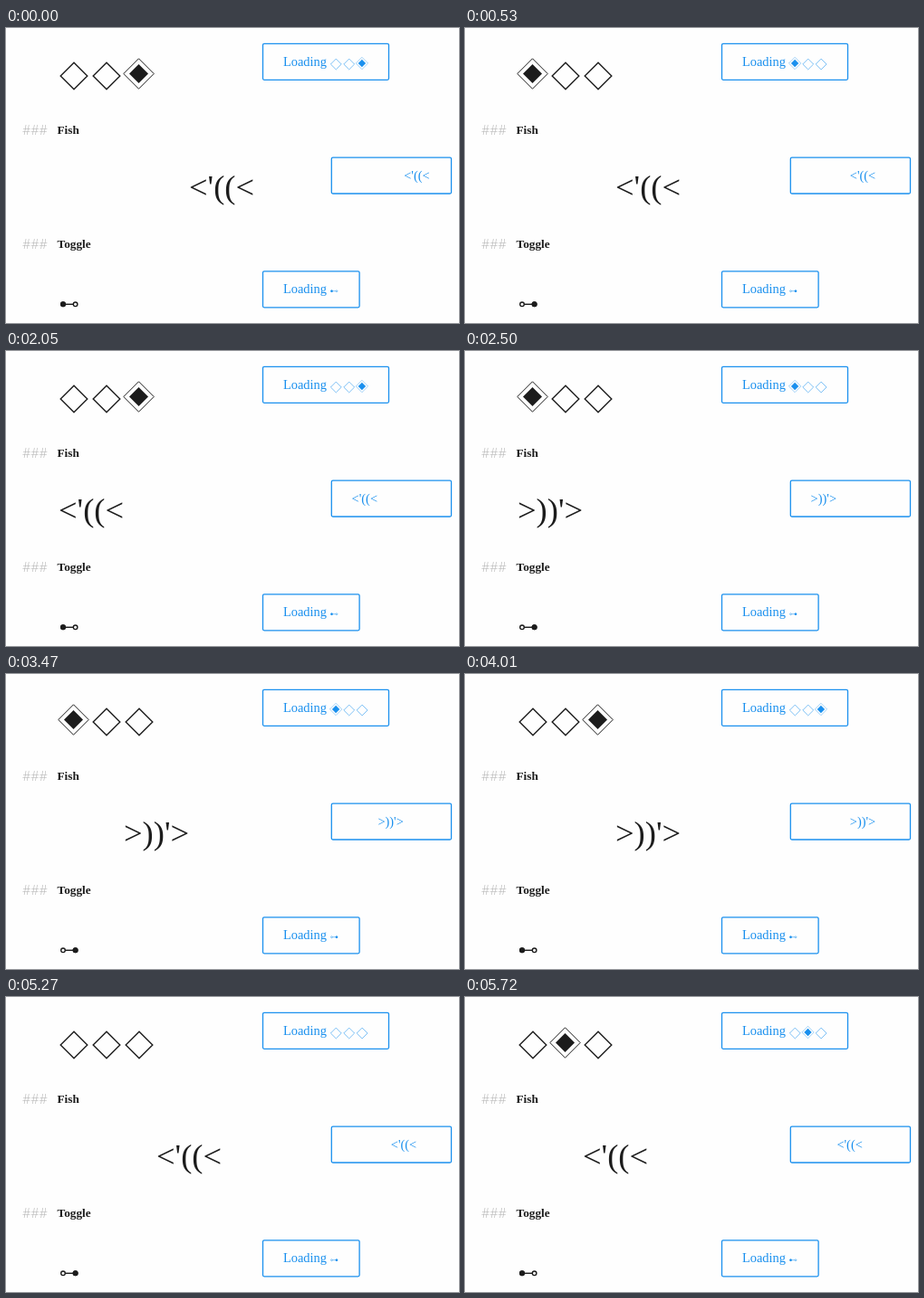
These frames come from a looping animation (500 px wide and 326 px high, 5.93 s). An HTML page:

```html
<!DOCTYPE html>
<html lang="en">
<head>
<meta charset="utf-8">
<title>Text spinners</title>
<style>
  html, body { margin: 0; width: 100%; height: 100%; overflow: hidden; background: #fefefe; }
  svg { display: block; width: 500px; height: 326px; }
  text { font: 14.4px "Liberation Serif", serif; fill: currentColor; white-space: pre; }
  .ink { color: #1c1c1c; }
  .blue { color: #1a90ee; }
  .title { font-weight: bold; font-size: 13.3px; }
  .hash { font: 300 14.4px "Open Sans", sans-serif; fill: #b4b4b4; }
  .big { font-size: 36.5px; }
  .button { fill: none; stroke: currentColor; stroke-width: 1.3; }
  .line { fill: none; stroke: currentColor; stroke-width: 1.4; }
  .thin { fill: none; stroke: currentColor; stroke-width: 1; }
  .solid { fill: currentColor; }
</style>
</head>
<body>
<svg viewBox="0 0 500 326">
  <defs>
    <g id="diamonds"></g>
    <g id="toggle">
      <path class="line" d="M65.5 305.3H74"/>
      <circle class="line" cx="63" cy="305.3" r="2.3"/>
      <circle class="line" cx="76.6" cy="305.3" r="2.3"/>
      <circle class="solid" id="knob" cy="305.3" r="3"/>
    </g>
  </defs>

  <g class="ink">
    <use href="#diamonds"/>
    <text class="hash" x="18" y="117.5">###</text>
    <text class="title" x="56.5" y="117">Fish</text>
    <text class="big" id="fish" y="187.5"></text>
    <text class="hash" x="18" y="243.5">###</text>
    <text class="title" x="56.5" y="243">Toggle</text>
    <use href="#toggle"/>
  </g>

  <g class="blue">
    <rect class="button" x="283.5" y="17.3" width="139" height="40" rx="1.5"/>
    <text x="306" y="42">Loading</text>
    <use href="#diamonds" transform="translate(334.3 18.8) scale(.4)"/>
    <rect class="button" x="359.3" y="143.2" width="132.2" height="39.8" rx="1.5"/>
    <text id="smallFish" y="168.3"></text>
    <rect class="button" x="283.5" y="268.8" width="106.6" height="40" rx="1.5"/>
    <text x="306" y="293.4">Loading</text>
    <use href="#toggle" transform="translate(334.3 168.6) scale(.4)"/>
  </g>
</svg>
<script>
const LOOP = 5930;
const STEPS = [0, 260, 530, 790, 1060, 1240, 1510, 1780, 2050, 2230, 2500, 2770,
  3030, 3300, 3470, 3740, 4010, 4280, 4460, 4730, 5000, 5270, 5540, 5720];
const LANES = 5;
const byId = id => document.getElementById(id);

const rhombus = (x, y, r, style) =>
  `<path class="${style}" d="M${x - r} ${y}l${r} ${-r} ${r} ${r} ${-r} ${r}z"/>`;

function diamond(slot, active) {
  const x = 75 + slot * 36;
  return active
    ? rhombus(x - .5, 50.5, 16.7, "thin") + rhombus(x - .5, 50.5, 10.5, "solid")
    : rhombus(x, 53, 14.8, "line");
}

function showFish(hop) {
  const phase = hop % (2 * LANES);
  const leftward = phase < LANES;
  const lane = leftward ? LANES - 1 - phase : phase - LANES;
  const place = (el, x) => {
    el.textContent = leftward ? "<'((<" : ">))'>";
    el.setAttribute("x", x);
  };
  place(byId("fish"), 58 + lane * 36);
  place(byId("smallFish"), 381.6 + lane * 14.4);
}

function show(step) {
  // Diamonds cycle: third, none, first, second.
  const active = [2, -1, 0, 1][step % 4];
  byId("diamonds").innerHTML = [0, 1, 2].map(i => diamond(i, i === active)).join("");
  byId("knob").setAttribute("cx", [0, 3].includes(step % 4) ? 63 : 76.6);
  showFish(Math.floor((step + 1) / 2));
}

const start = performance.now();
let shown = -1;

function tick() {
  const time = (performance.now() - start) % LOOP;
  const step = STEPS.findLastIndex(t => t <= time);
  if (step !== shown) show(shown = step);
  requestAnimationFrame(tick);
}
tick();
</script>
</body>
</html>
```
